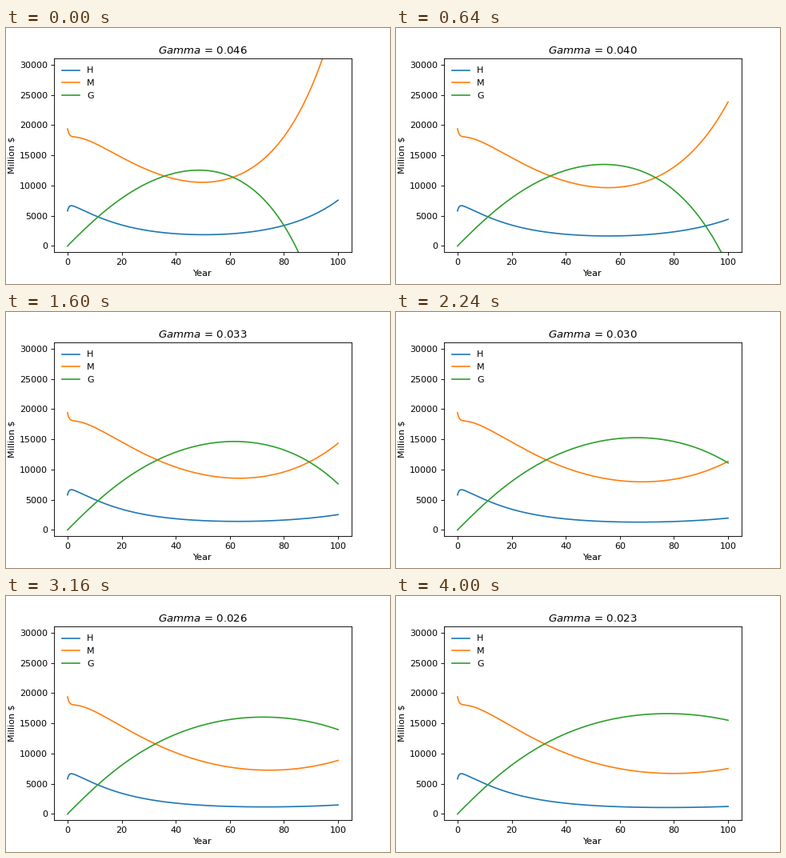
Recreate the animation shown at these times as a matplotlib script. Size 480x320 px, loop 4.04 s.

```python
import matplotlib.pyplot as plt
import numpy as np
from matplotlib.animation import FuncAnimation

FRAMES = 101
INTERVAL = 40
DT = 0.05

plt.rcParams.update({"font.family": "DejaVu Sans", "font.size": 10})

# The growth rate follows from a doubling time of 15 to 30 years.
gammas = np.log(2) / np.linspace(15, 30, FRAMES)
years = np.arange(0, 100 + DT / 2, DT)


def spending(t):
    return 29.5 * np.exp(gammas * t)


def total(t):
    """Money in circulation, H + M + G."""
    slow = 4000 * np.exp(-t / 32) - 2765 * np.exp(-t / 6)
    dip = 220 * t * np.exp(-t / 1.5)
    return 23950 + slow - dip + 0.5 * spending(t)


def simulate(tax=0.0263, lag=0.9):
    """Integrate all growth rates at once; returns H, M, G by year."""
    h = np.full(FRAMES, 5800.0)
    g = np.zeros(FRAMES)
    rows = []
    for t in years:
        s = spending(t)
        m = total(t) - h - g
        rows.append((h, m, g))
        share = 0.129 + 0.253 * np.exp(-0.0485 * t)
        h = h + DT * (share * m + lag * s - h) / lag
        g = g + DT * (tax * m - s)
    return np.array(rows).transpose(1, 2, 0)


curves = simulate()

fig = plt.figure(figsize=(6, 4), dpi=80, facecolor="white")
fig.subplots_adjust(left=0.125, right=0.9, bottom=0.125, top=0.88)
ax = fig.add_subplot()
lines = [ax.plot([], [], lw=1.5, label=name)[0] for name in "HMG"]
ax.set(xlim=(-5, 105), ylim=(-1000, 31000), xlabel="Year", ylabel="Million $")
ax.legend(loc="upper left", frameon=False)
title = ax.set_title("")


def update(i):
    for line, curve in zip(lines, curves):
        line.set_data(years, curve[i])
    title.set_text(f"$Gamma$ = {gammas[i]:.3f}")
    return [*lines, title]


anim = FuncAnimation(fig, update, frames=FRAMES, interval=INTERVAL,
                     repeat=True, repeat_delay=0, blit=False)
plt.show()
```
